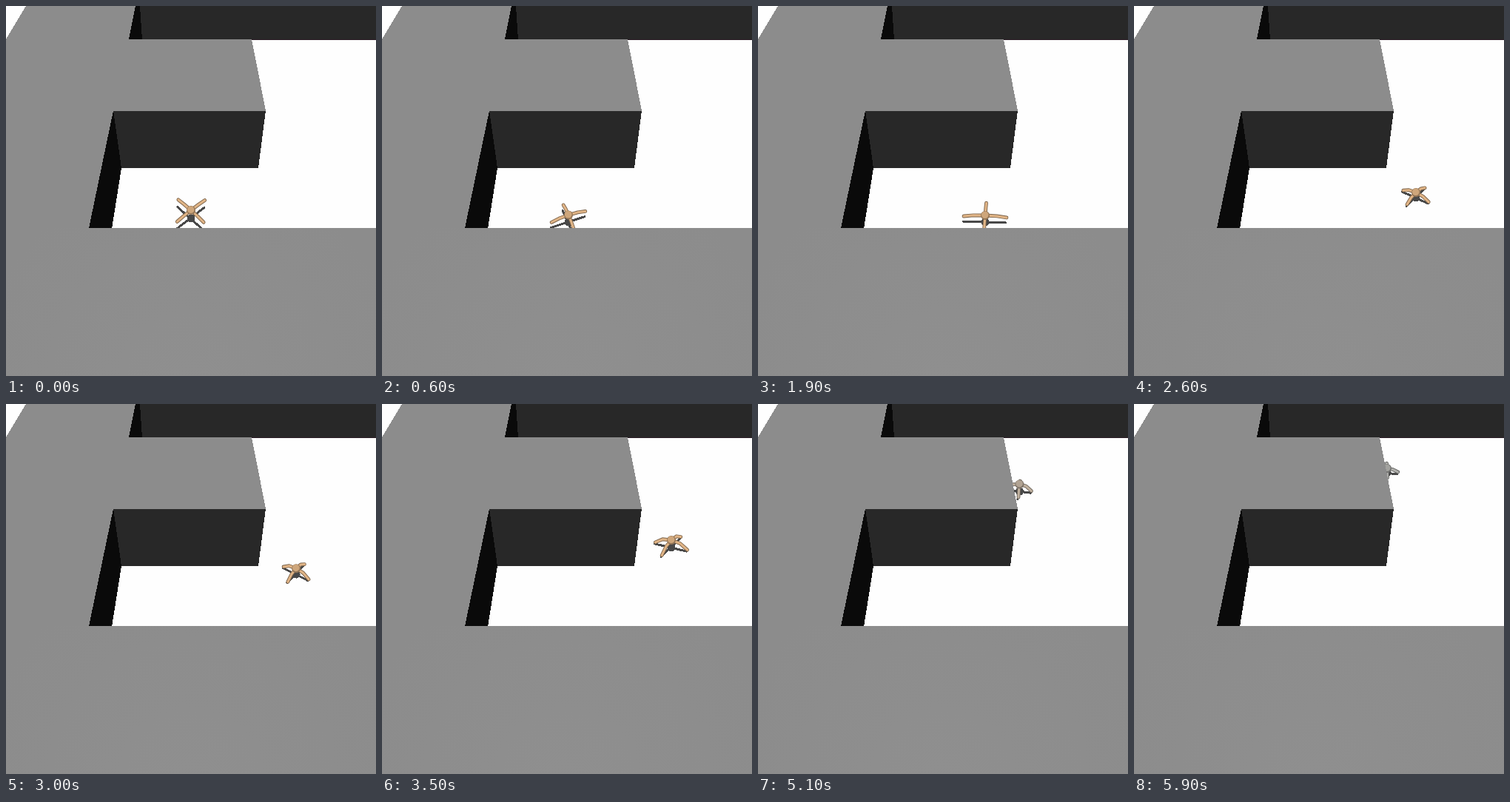
An HTML page that plays this animation: 500 px wide and 500 px high, repeating every 6 s.

```html
<!DOCTYPE html>
<html lang="en">
<head>
<meta charset="utf-8">
<title>Walker in a maze</title>
<style>
html, body { margin: 0; width: 100%; height: 100%; overflow: hidden; background: #fefefe; }
svg { display: block; width: 500px; height: 500px; }
path { fill: none; stroke-linecap: round; stroke-linejoin: round; }
.crisp { shape-rendering: crispEdges; }
</style>
</head>
<body>
<svg viewBox="0 0 500 500">
  <defs>
    <radialGradient id="glow" gradientUnits="userSpaceOnUse" cx="250" cy="510" r="290">
      <stop offset="0" stop-color="#8f8f8f"/>
      <stop offset="1" stop-color="#8c8c8c"/>
    </radialGradient>
  </defs>
  <rect width="500" height="500" fill="#fefefe"/>
  <g class="crisp">
    <polygon points="181,0 500,0 500,46 184,46" fill="#282828"/>
    <rect x="184" y="45" width="316" height="1" fill="#2a1a24"/>
  </g>
  <g id="walker"></g>
  <g class="crisp">
    <polygon points="174,0 181,0 184,46 165,46" fill="#0a0a0a"/>
    <polygon points="145,141 351,141 341,219 156,219" fill="#282828"/>
    <polygon points="145,141 156,219 143,301 111,301" fill="#0a0a0a"/>
    <polygon points="27,0 175,0 166,45 332,45 351,141.500 145,141.500 112,300 0,300 0,45" fill="#8c8c8c"/>
    <rect y="300" width="500" height="200" fill="url(#glow)"/>
  </g>
</svg>
<script>
const LOOP = 6000, STEP = 100;
const SQUASH = 0.65; // camera tilt
const NS = 'http://www.w3.org/2000/svg';

// Key points: time, x, y, turn in degrees, leg reach, foot droop, height over the floor.
const keys = [
  [0, 250, 276, -43, 29, 1, 11],
  [1200, 263, 290, 8, 22, 4, 8],
  [1900, 307, 283, 3, 29, 2, 9],
  [2600, 381, 252, 35, 21, 5, 7],
  [3500, 391, 184, 27, 23, 8, 10],
  [4300, 373, 146, 15, 19, 12, 14],
  [5900, 342, 87, 5, 15, 3, 6]
];
const TAN = [224, 180, 134], GREY = [176, 176, 172];

const root = document.getElementById('walker');

function make(tag, attrs) {
  const el = document.createElementNS(NS, tag);
  for (const k in attrs) el.setAttribute(k, attrs[k]);
  return root.appendChild(el);
}

const shadow = make('path', { stroke: '#484848', 'stroke-width': 3, class: 'crisp' });
const shadowBody = make('circle', { r: 5.5, fill: '#484848', class: 'crisp' });
const edge = make('path', { 'stroke-width': 4.8 });
const skin = make('path', { 'stroke-width': 3 });
const rim = make('circle', { r: 6 });
const body = make('circle', { r: 4.8 });

function slope(i, n) {
  const a = keys[i - 1], b = keys[i + 1];
  return a && b ? (b[n] - a[n]) / (b[0] - a[0]) : 0;
}

// Smooth cubic through the key points, for every column at once.
function sample(t) {
  let i = 0;
  while (i < keys.length - 2 && t >= keys[i + 1][0]) i++;
  const a = keys[i], b = keys[i + 1], dt = b[0] - a[0];
  const u = (t - a[0]) / dt, v = 1 - u;
  return a.map((_, n) =>
    a[n] * (1 + 2 * u) * v * v + b[n] * u * u * (3 - 2 * u) +
    dt * u * v * (slope(i, n) * v - slope(i + 1, n) * u));
}

// Four legs a quarter turn apart; neighbours swing in opposite phase.
function legs(t, x, y, turn, reach, droop) {
  const swing = 7 * Math.sin(2 * Math.PI * (t - 500) / 700);
  let d = '';
  for (let k = 0; k < 4; k++) {
    const angle = (turn + 90 * k + (k % 2 ? swing : -swing)) * Math.PI / 180;
    const dx = reach * Math.cos(angle), dy = reach * SQUASH * Math.sin(angle);
    const at = (f, drop) => (x + f * dx).toFixed(2) + ' ' + (y + f * dy + drop).toFixed(2);
    d += `M${at(0, 0)}L${at(0.55, droop * 0.2)}L${at(1, droop)}`;
  }
  return d;
}

function place(el, x, y) {
  el.setAttribute('cx', x);
  el.setAttribute('cy', y);
}

function draw(t) {
  const [, x, y, turn, reach, droop, height] = sample(t);
  const fade = Math.min(1, Math.max(0, (t - 3500) / 2400));
  const tint = k => 'rgb(' + TAN.map((c, i) => Math.round(k * (c + (GREY[i] - c) * fade))) + ')';

  shadow.setAttribute('d', legs(t, x - 1, y + height, turn, reach, 0));
  place(shadowBody, x, y + height);

  const d = legs(t, x, y, turn, reach, droop);
  edge.setAttribute('d', d);
  edge.setAttribute('stroke', tint(0.55));
  skin.setAttribute('d', d);
  skin.setAttribute('stroke', tint(1));
  place(rim, x, y);
  rim.setAttribute('fill', tint(0.65));
  place(body, x - 0.3, y - 0.7);
  body.setAttribute('fill', tint(0.92));
}

const start = performance.now();

function tick() {
  const t = (performance.now() - start) % LOOP;
  draw(t < 2 * STEP ? 0 : Math.floor(t / STEP) * STEP);
  requestAnimationFrame(tick);
}

tick();
</script>
</body>
</html>
```
